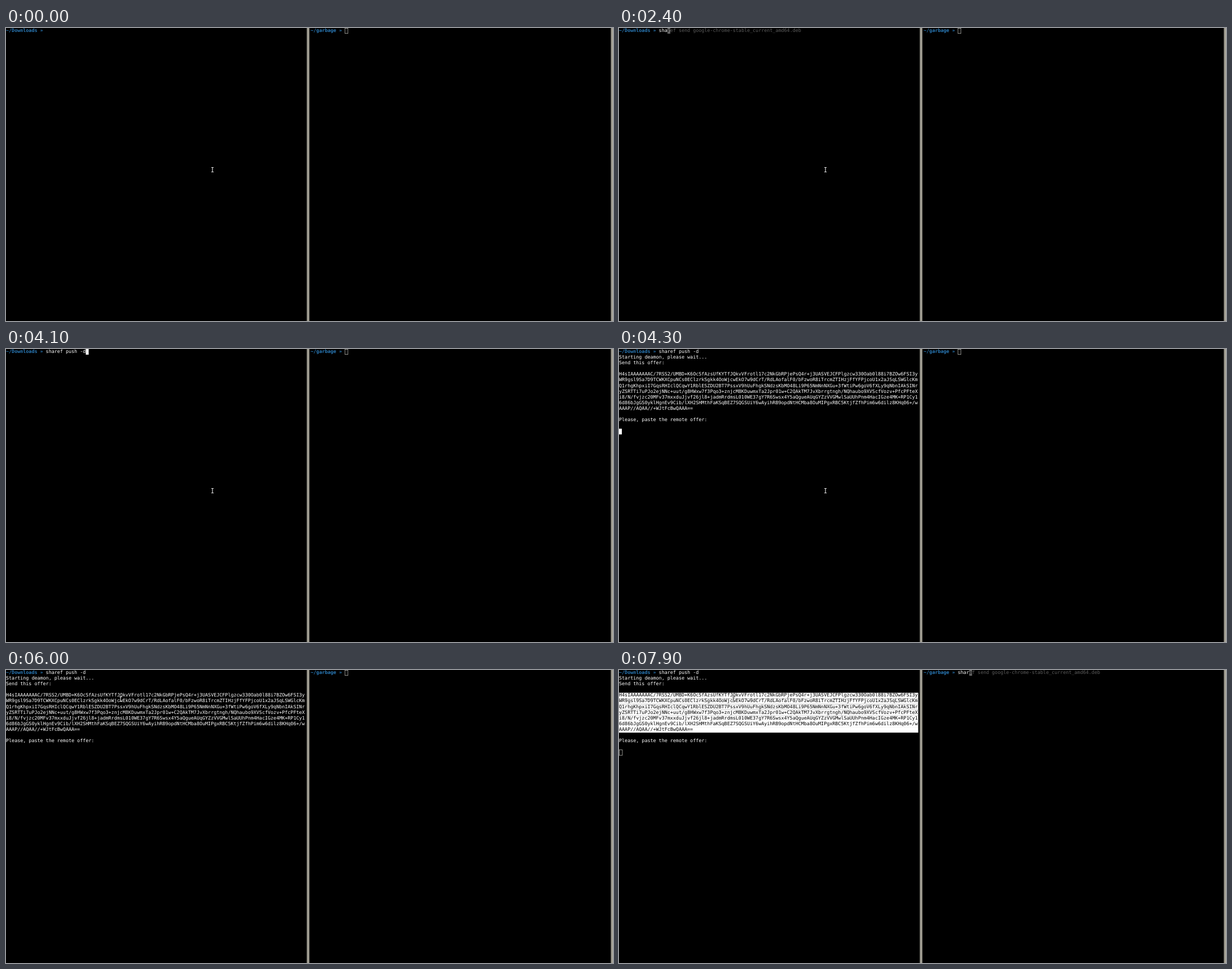
These frames come from a looping animation (1076 px wide and 520 px high, 8 s). An HTML page:

```html
<!DOCTYPE html>
<html lang="en">
<head>
<meta charset="utf-8">
<title>Two terminals</title>
<style>
  html, body { margin: 0; width: 100%; height: 100%; overflow: hidden; background: #000; }
  #stage { position: relative; width: 1076px; height: 520px; overflow: hidden; background: #000; }
  /* Panes use 8 x 16 cells, scaled down as a whole */
  .pane {
    position: absolute; top: 0; left: 0; width: 840px;
    transform: scale(.6315); transform-origin: 0 0;
    font: 13.288px/16px "DejaVu Sans Mono", monospace;
    text-rendering: geometricPrecision; font-variant-ligatures: none;
    color: #fff;
  }
  #right { left: 539.5px; }
  .row { height: 16px; width: 840px; white-space: pre; }
  .path { color: #2a7ab8; font-weight: bold; }
  .hint { color: #5c5c5c; }
  .cell { display: inline-block; width: 8px; height: 16px; vertical-align: top; }
  .solid { background: #fff; }
  .over { background: #666; color: #000; }
  .hollow { box-sizing: border-box; width: 9.5px; border: 1.6px solid #e4e4dc; }
  .marked .offer { background: #fff; color: #000; }
  .word .offer:last-child { width: 208px; }
  .bar {
    position: absolute; top: 0; width: 7px; height: 520px;
    background: linear-gradient(90deg, #1c1c1a 0 1px, #55534d 1px 2px, #a7a498 2px 5px, #55534d 5px 6px, #1c1c1a 6px);
  }
  #split { left: 532px; }
  #edge { left: 1071px; }
  #mouse { position: absolute; left: -4px; top: -6px; width: 8px; height: 12px; }
</style>
</head>
<body>
<div id="stage">
  <div class="pane" id="left">
    <div class="row" id="cmdL"></div>
    <div id="output">
      <div class="row">Starting deamon, please wait...</div>
      <div class="row">Send this offer:</div>
      <div class="row"></div>
      <div id="offer"></div>
      <div class="row"></div>
      <div class="row">Please, paste the remote offer:</div>
      <div class="row"></div>
      <div class="row" id="input"></div>
    </div>
  </div>
  <div class="pane" id="right"><div class="row" id="cmdR"></div></div>
  <div class="bar" id="split"></div>
  <div class="bar" id="edge"></div>
  <svg id="mouse" viewBox="-4 -6 8 12" fill="none">
    <path d="M-2-4H2M-2 4H2M0-4V4" stroke="#000" stroke-width="2"/>
    <path d="M-2-4H2M-2 4H2M0-4V4" stroke="#eee" stroke-width="1.1"/>
  </svg>
</div>
<script>
const LOOP = 8000;
const HISTORY = 'sharef send google-chrome-stable_current_amd64.deb';
const OFFER = [
  'H4sIAAAAAAAC/7RSS2/UMBD+K6OcSfAzsUfKYTfJQkvVFrotl17c2NkGbRPjePsQ4r+j3UASVEJCFPlgzcw330Oab0l88i7BZOw6FSI3y',
  'WR9gsl9Sa7D9TCWKXCpuNCs0EClzrkSgkk4OoWjcwEkO7w9dCrT/RdLAofalF0/bFzwoR8iTrcmZTIHzjFfYFPjcoU1x2aJSqLSWGlcKm',
  'Q1rhgKhpxiI7GqsRHIclQCqwY1RblESZDU2BT7PssxV9hUuFhgkSNdzsKbMO48Li9P65NmNnNXGu+3fWtiPw6goV6fXLy9qNbnIAkSINr',
  'yZSRTTi7uPJo2ejNNc+uut/g8HWxw7f3Pqo3+znjcM8KDuwmxTa2Jpr01w+C2QAkTM7JvXbrrgtngh/NQhaubo9XVScfVozv+PfcPFteX',
  'i8/N/fvjzc20MFv37mxxduJjvf26jl8+jadmRrdmsL010WE37gY7R6Swsx4Y5aQgueAUqGYZzVVGMwlSaUUhPnm4HacIGze4MK+RP1Cy1',
  '6d86bJgGS0yklHgnEv9Cib/lXH2SHMthFaKSqBEZ7SQGSUiY6wAyihRB9opdNtHCMba8OuMIPgxRBC5KtjfZfhPim6w6dilz8KHq06+/w',
  'AAAP//AQAA//+WJtFcBwQAAA=='
];

// Each track is a list of [start ms, value], held until the next start
const TYPED_L = [[0, ''], [1200, 'sh'], [1400, 'shr'], [1600, 'shre'], [1900, 'shref'],
  [2200, 'shr'], [2400, 'sha'], [2500, 'shar'], [2800, 'sharef'], [3100, 'sharef '],
  [3200, 'sharef p'], [3400, 'sharef pu'], [3600, 'sharef push'], [4100, 'sharef push -d']];
const CURSOR_L = [[0, ''], [400, 'solid'], [4300, '']];
const INPUT = [[0, ''], [4300, 'solid'], [4800, ''], [5400, 'solid'], [6000, ''],
  [6200, 'solid'], [7000, 'hollow']];
const TYPED_R = [[0, ''], [7500, 's'], [7800, 'sha'], [7900, 'shar']];
const CURSOR_R = [[0, 'hollow'], [7000, 'solid']];
const MARK = [[0, ''], [5900, 'marked word'], [6000, ''], [6200, 'marked']];
const MOUSE = [[0, [366, 251.5]], [5000, [353, 236]], [5100, [322, 200]], [5200, [288, 158]],
  [5300, [263, 127]], [5400, [253, 115]], [5800, [203, 51.5]]];

const $ = id => document.getElementById(id);
const at = (track, t) => track.filter(([start]) => start <= t).pop()[1];
const span = (cls, text) => `<span class="${cls}">${text}</span>`;
const cell = (kind, char = ' ') => kind ? span('cell ' + kind, char) : '';

function setHTML(id, html) {
  const el = $(id);
  if (el.shown !== html) el.innerHTML = el.shown = html;
}

function commandLine(path, typed, cursor) {
  const hint = typed && cursor && HISTORY.startsWith(typed) ? HISTORY.slice(typed.length) : '';
  const tail = hint ? cell('over', hint[0]) + span('hint', hint.slice(1)) : cell(cursor);
  return span('path', path + ' »') + ' ' + typed + tail;
}

function render(t) {
  setHTML('cmdL', commandLine('~/Downloads', at(TYPED_L, t), at(CURSOR_L, t)));
  setHTML('cmdR', commandLine('~/garbage', at(TYPED_R, t), at(CURSOR_R, t)));
  setHTML('input', cell(at(INPUT, t)));
  $('output').style.visibility = t < 4300 ? 'hidden' : 'visible';
  $('offer').className = at(MARK, t);
  const [x, y] = at(MOUSE, t);
  $('mouse').style.transform = `translate(${x}px, ${y}px)`;
}

$('offer').innerHTML = OFFER.map(line => `<div class="row offer">${line}</div>`).join('');

const begin = performance.now();
function tick() {
  render((performance.now() - begin) % LOOP);
  requestAnimationFrame(tick);
}
render(0);
requestAnimationFrame(tick);
</script>
</body>
</html>
```
